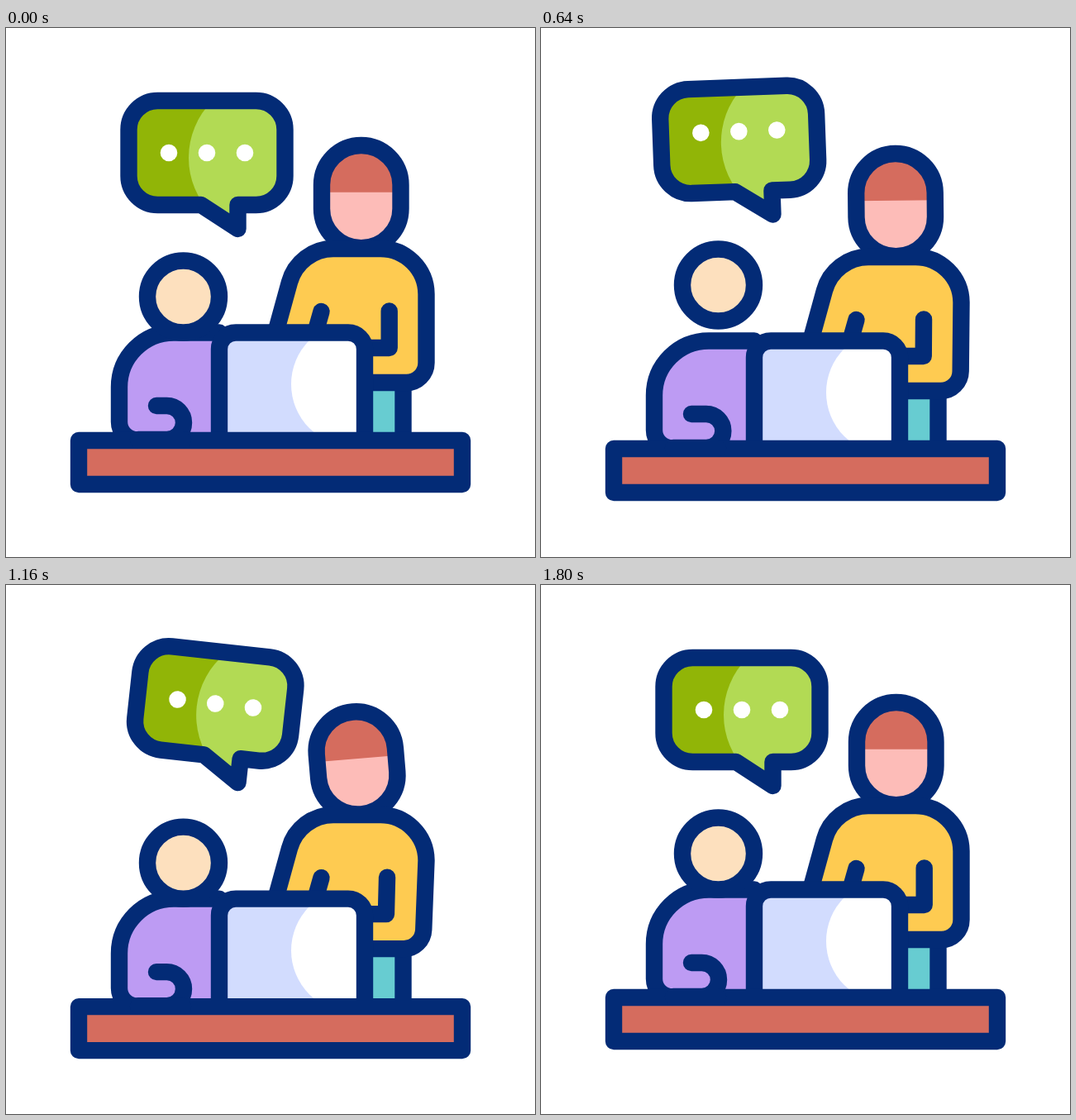
An HTML page with a canvas that plays this animation: 640 px wide and 640 px high, repeating every 2 s.

```html
<!DOCTYPE html>
<html lang="en">
<head>
<meta charset="utf-8">
<title>Desk conversation</title>
<style>
html, body { margin: 0; width: 100%; height: 100%; overflow: hidden; background: #fff; }
canvas { display: block; width: 100vw; height: 100vh; }
</style>
</head>
<body>
<canvas id="stage" width="640" height="640"></canvas>
<script>
const ctx = document.getElementById('stage').getContext('2d');
const LOOP = 2000, STEP = 40, RAD = Math.PI / 180;
const C = {
  line: '#032b76', olive: '#91b507', lime: '#b2da54', red: '#d56c5e', pink: '#fdbcb8',
  yellow: '#fecb51', teal: '#67ccd1', purple: '#bd9bf3', skin: '#fde0be',
  ice: '#d2dcfe', white: '#fff'
};

// cubic-bezier(x1, 0, x2, 1)
function ease(u, x1 = 0.58, x2 = 0.42) {
  if (u <= 0) return 0;
  if (u >= 1) return 1;
  let lo = 0, hi = 1, s;
  for (let i = 0; i < 24; i++) {
    s = (lo + hi) / 2;
    const r = 1 - s;
    if (3 * x1 * r * r * s + 3 * x2 * r * s * s + s * s * s < u) lo = s;
    else hi = s;
  }
  return s * s * (3 - 2 * s);
}

// keys: [time, value, x1, x2]; the curve belongs to the leg that ends at the key
function track(t, ...keys) {
  if (t <= keys[0][0]) return keys[0][1];
  for (let i = 1; i < keys.length; i++) {
    const [t0, v0] = keys[i - 1], [t1, v1, x1, x2] = keys[i];
    if (t <= t1) return v0 + (v1 - v0) * ease((t - t0) / (t1 - t0), x1, x2);
  }
  return keys[keys.length - 1][1];
}

function fill(path, color) {
  ctx.fillStyle = color;
  ctx.fill(path);
}

function outline(path) {
  ctx.stroke(path);
}

function disc(x, y, r) {
  const p = new Path2D();
  p.arc(x, y, r, 0, 2 * Math.PI);
  return p;
}

function box(x, y, w, h) {
  const p = new Path2D();
  p.rect(x, y, w, h);
  return p;
}

function clipped(shape, draw) {
  ctx.save();
  ctx.clip(shape);
  draw();
  ctx.restore();
}

function group(draw, dy, deg = 0, px = 0, py = 0) {
  ctx.save();
  ctx.translate(px, py + dy);
  ctx.rotate(deg * RAD);
  ctx.translate(-px, -py);
  draw();
  ctx.restore();
}

const bubblePath = new Path2D(
  'M183.5 88H302.5A35 35 0 0 1 337.5 123V179A35 35 0 0 1 302.5 214H280.5V243' +
  'L236 214H183.5A35 35 0 0 1 148.5 179V123A35 35 0 0 1 183.5 88Z');
const facePath = new Path2D(
  'M382 189.7A47.75 47.75 0 0 1 477.5 189.7V218.5A47.75 47.75 0 0 1 382 218.5Z');
const screenPath = new Path2D(
  'M258 498V388.5A20 20 0 0 1 278 368.5H414A20 20 0 0 1 434 388.5V498');
const sitterPath = new Path2D(
  'M258 368.5H203A66 66 0 0 0 137 434.5V476.5A22 22 0 0 0 159 498.5H194.5');
const sitterFill = new Path2D(sitterPath);
sitterFill.lineTo(258, 498.5);
const deskPath = box(88, 499, 464, 53);

function bubble(dots) {
  fill(bubblePath, C.olive);
  clipped(bubblePath, () => fill(disc(318, 157, 97), C.lime));
  outline(bubblePath);
  for (const x of [197, 243, 289]) fill(disc(x, 151 + dots, 10.3), C.white);
}

function face() {
  fill(facePath, C.pink);
  clipped(facePath, () => fill(box(370, 130, 120, 68.7), C.red));
  outline(facePath);
}

function stander(bend) {
  fill(box(434, 429, 46.5, 70), C.teal);
  outline(new Path2D('M480.5 429V498'));

  const torso = new Path2D('M328 362L343 307.5A55 55 0 0 1 396 267H453A55.5 55.5 0 0 1 508.5 322');
  torso.arcTo(508.5 - 1.1 * bend, 429, 440, 429, 24);
  torso.lineTo(434, 429);
  fill(torso, C.yellow);
  outline(torso);

  const arms = new Path2D('M381.5 343L373 373');
  arms.moveTo(463.7 - 0.7 * bend, 342.5);
  arms.lineTo(463.7 - bend, 387);
  arms.lineTo(434, 387);
  outline(arms);
}

function screen() {
  fill(screenPath, C.ice);
  clipped(screenPath, () => fill(disc(420, 431, 75), C.white));
  outline(screenPath);
}

function sitter(reach) {
  fill(sitterFill, C.purple);
  outline(sitterPath);
  const x = 194.5 + reach;
  outline(new Path2D(`M182 457H${x}A20.5 20.5 0 0 1 ${x} 498H160`));
}

function sitterHead() {
  const head = disc(214.5, 325, 43.5);
  fill(head, C.skin);
  outline(head);
}

function render(t) {
  const sink = track(t, [0, 0], [920, 12.8, 0.59, 0.55], [1800, 0, 0.54, 0.35]);
  const lift = track(t, [80, 0], [740, -18], [1400, 0]);
  const swing = track(t, [80, 0], [520, -3.4], [960, 9.1], [1440, 0]);
  const dots = track(t, [400, 0], [740, -11.2], [1080, 0]);
  const tilt = track(t, [520, 0], [960, -5.5], [1040, -5.5], [1440, 0]);
  const bend = track(t, [480, 0], [960, 5.5], [1440, 0]);
  const nod = track(t, [80, 0], [510, -27], [980, 0]);
  const reach = track(t, [80, 0], [400, 19], [800, 0]);

  ctx.fillStyle = C.white;
  ctx.fillRect(0, 0, 640, 640);
  ctx.strokeStyle = C.line;
  ctx.lineWidth = 20.4;
  ctx.lineCap = ctx.lineJoin = 'round';

  group(() => bubble(dots), lift, swing, 281, 243);
  group(face, sink, tilt, 429.7, 267);
  group(() => {
    stander(bend);
    sitter(reach);
    screen();
  }, sink);
  group(sitterHead, sink + nod);
  group(() => {
    fill(deskPath, C.red);
    outline(deskPath);
    outline(new Path2D('M160 498.5H214'));
  }, sink);
}

const start = performance.now();
function frame() {
  const t = (performance.now() - start) % LOOP;
  render(Math.floor(t / STEP) * STEP);
  requestAnimationFrame(frame);
}
frame();
</script>
</body>
</html>
```
